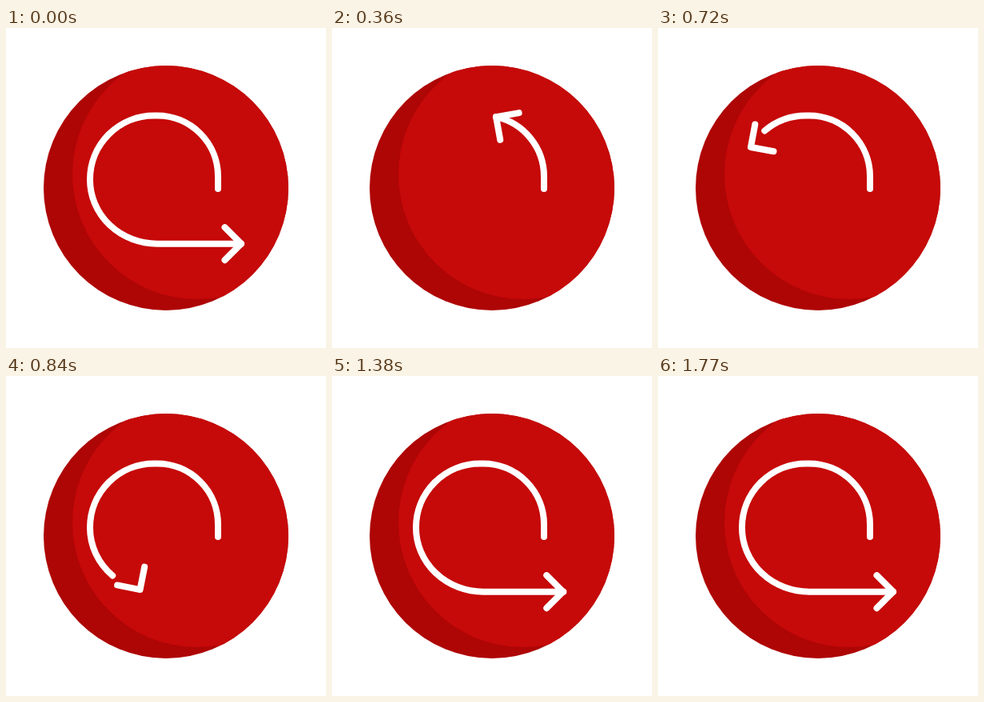
Animation of 400 by 400 pixels, one loop 3800 ms. Source, as an HTML page:

```html
<!DOCTYPE html>
<html lang="en">
<head>
<meta charset="utf-8">
<title>Turning arrow</title>
<style>
  html, body { margin: 0; width: 100%; height: 100%; overflow: hidden; background: #fff; }
  svg { display: block; width: 100%; height: 100%; }
  .stroke { fill: none; stroke: #fff; stroke-width: 8; stroke-linecap: round; stroke-linejoin: round; }
</style>
</head>
<body>
<svg viewBox="0 0 400 400">
  <clipPath id="disc"><circle cx="200" cy="200" r="153"/></clipPath>
  <g clip-path="url(#disc)">
    <rect width="400" height="400" fill="#ae0505"/>
    <circle cx="239" cy="183" r="156" fill="#c60909"/>
  </g>
  <path id="line" class="stroke"
    d="M265 201V185.5A76 76 0 0 0 189 109.5H185A80 80 0 0 0 105 189.5A84 80 0 0 0 189 269.7H294"/>
  <path id="head" class="stroke" d="M-20.5 -20.5L0 0L-20.5 20.5"/>
</svg>
<script>
  const LOOP = 3800, STEP = 30;
  const RETRACT = 490, SETTLE_START = 1015, SETTLE_END = 1770;
  // The head turns, travels and draws its line out again at slightly different paces.
  const TURN_OUT = 500, HEAD_OUT = 525, LINE_OUT = 580;
  const SHORTEST = 38.7, SETTLE = 10, MAX_TURN = 260;

  const line = document.getElementById('line');
  const head = document.getElementById('head');
  const length = line.getTotalLength();

  const mix = (a, b, u) => a + (b - a) * u;

  function ease(time, start, end) {
    const u = Math.min(1, Math.max(0, (time - start) / (end - start)));
    return u * u * (3 - 2 * u);
  }

  // 0 at rest, 1 when fully drawn back.
  function pullBack(time, outTime) {
    return ease(time, 0, RETRACT) - ease(time, RETRACT, RETRACT + outTime);
  }

  function reach(time, outTime) {
    const settling = SETTLE * (1 - ease(time, SETTLE_START, SETTLE_END));
    const full = time < RETRACT ? length : length - settling;
    return mix(full, SHORTEST, pullBack(time, outTime));
  }

  function draw(time) {
    const tip = line.getPointAtLength(reach(time, HEAD_OUT));
    const turn = MAX_TURN * pullBack(time, TURN_OUT);
    line.setAttribute('stroke-dasharray', `${reach(time, LINE_OUT)} ${2 * length}`);
    head.setAttribute('transform', `translate(${tip.x} ${tip.y}) rotate(${turn})`);
  }

  const began = performance.now();
  function tick() {
    const time = (performance.now() - began) % LOOP;
    draw(Math.floor(time / STEP) * STEP);
    requestAnimationFrame(tick);
  }
  tick();
</script>
</body>
</html>
```
